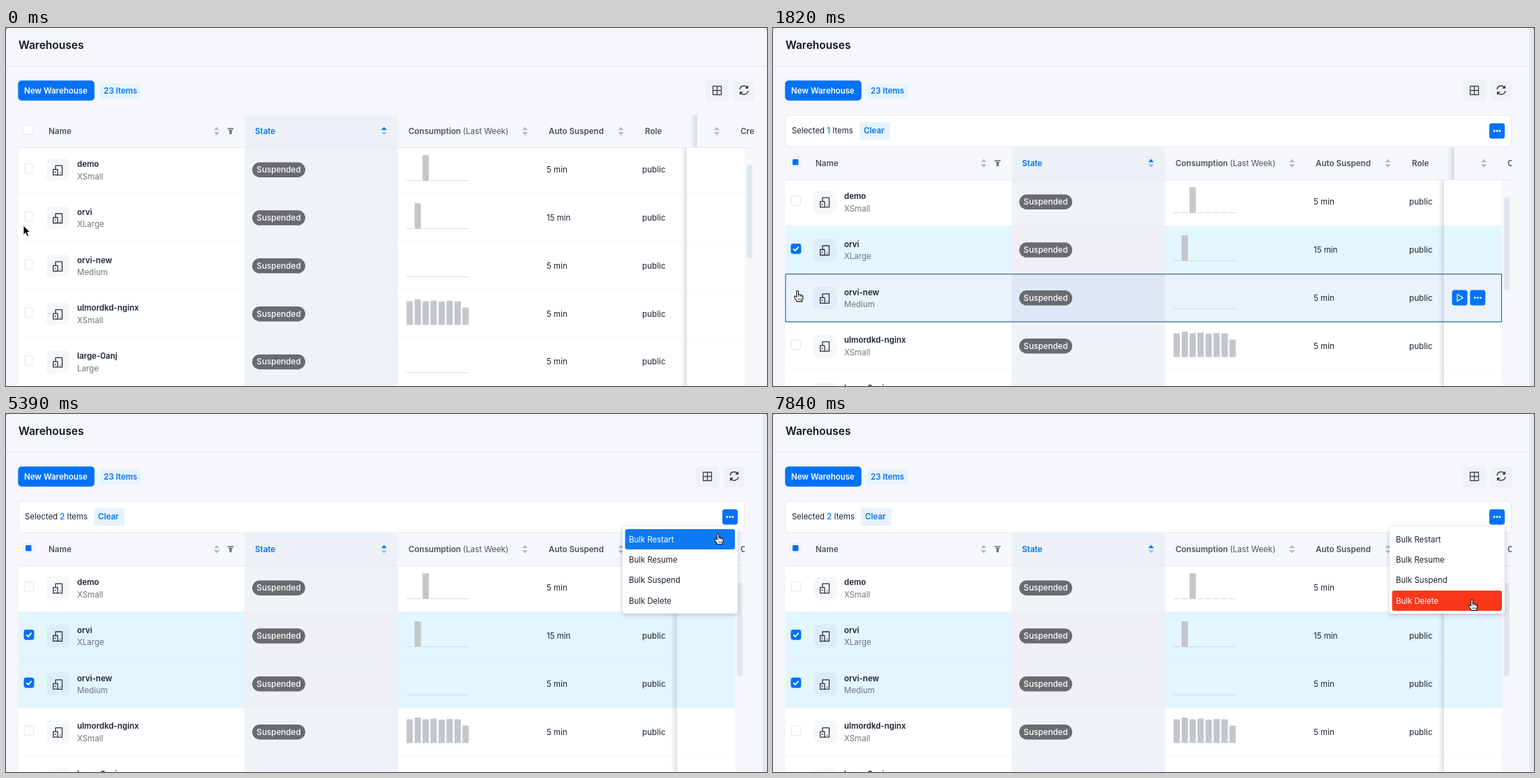
An HTML page that plays this animation: 1091 px wide and 513 px high, repeating every 7.91 s.

```html
<!DOCTYPE html>
<html lang="en">
<head>
<meta charset="utf-8">
<title>Warehouses</title>
<style>
  html, body { margin: 0; width: 100%; height: 100%; overflow: hidden; }
  svg { display: block; width: 1091px; height: 513px; background: #8a8d92; }
  text { font-family: Inter, "Open Sans", sans-serif; font-size: 11.5px; fill: #1b2430; white-space: pre; }
</style>
</head>
<body>
<svg id="stage" viewBox="0 0 1091 513"></svg>
<script>
const LOOP = 7910, STEP = 70, PITCH = 68.8, FADE = 200;
const BLUE = '#0072f5', PAGE = '#f5f7fa', LINE = '#e6eaef', GRAY = '#6d747c';
const FIRST_CLICK = 1090, SECOND_CLICK = 2380;

const rows = [
  { name: 'demo', size: 'XSmall', suspend: 5, bars: [0, 0, 37], hover: [[1090, 1330], [2890, 3000]] },
  { name: 'orvi', size: 'XLarge', suspend: 15, bars: [0, 37], hover: [[420, 1090], [1330, 1580], [2840, 2890]], near: 420, click: FIRST_CLICK },
  { name: 'orvi-new', size: 'Medium', suspend: 5, bars: [], hover: [[1580, 2840]], near: 2100, click: SECOND_CLICK },
  { name: 'ulmordkd-nginx', size: 'XSmall', suspend: 5, bars: [34, 36.5, 34, 35, 33.5, 34.5, 34, 25], hover: [] },
  { name: 'large-0anj', size: 'Large', suspend: 5, bars: [], hover: [] }
];
const menuItems = [
  { label: 'Bulk Restart', hover: [[5200, 5870]] },
  { label: 'Bulk Resume', hover: [[5870, 6450]] },
  { label: 'Bulk Suspend', hover: [[6450, 7060]] },
  { label: 'Bulk Delete', hover: [[7060, LOOP]], color: '#fa371b' }
];
const menuOpen = [[3330, 3780], [4200, LOOP]];

// time, x, y of the pointer's hot spot
const path = [
  [0, 25, 283], [70, 25, 283], [140, 31, 278], [279, 31, 278], [280, 35, 277], [420, 35, 277],
  [700, 33, 273], [1240, 33, 273], [1500, 35, 330], [1780, 35, 376], [2030, 36, 378], [2170, 40, 385],
  [2400, 40, 385], [2600, 150, 350], [2870, 592, 250], [3150, 1020, 158], [3290, 1040, 150],
  [3500, 1054, 148], [3700, 1054, 148], [3920, 1037, 149], [5110, 1037, 149], [5400, 1020, 172],
  [5700, 1012, 182], [5880, 1007, 197], [6300, 1007, 197], [6500, 1005, 226], [6800, 1004, 240],
  [7060, 1003, 266], [7770, 1003, 266], [7840, 1002, 266], [LOOP, 1002, 266]
];

const ramp = (t, start, length) => Math.min(1, Math.max(0, (t - start) / length));
const inside = (t, spans) => spans.some(([a, b]) => t >= a && t < b);
const fade = (t, spans) =>
  Math.max(0, ...spans.map(([a, b]) => ramp(t, a, FADE) - ramp(t, b, FADE)));

const rect = (x, y, w, h, fill, r = 0, more = '') =>
  `<rect x="${x}" y="${y}" width="${w}" height="${h}" fill="${fill}" rx="${r}" ${more}/>`;
const text = (x, y, s, weight = 400, fill = '#1b2430', size = 11.5, more = '') =>
  `<text x="${x}" y="${y}" font-weight="${weight}" style="fill:${fill};font-size:${size}px" ${more}>${s}</text>`;
const shape = (d, fill = 'none', stroke = 'none', width = 1.2, more = '') =>
  `<path d="${d}" fill="${fill}" stroke="${stroke}" stroke-width="${width}" stroke-linejoin="round" ${more}/>`;
const at = (x, y, s) => `<g transform="translate(${x} ${y})">${s}</g>`;

const checkbox = (x, y, border = '#e2e6eb') =>
  rect(x + .5, y + .5, 13.5, 13.5, '#fff', 2.5, `stroke="${border}"`);
const dots = (x, y) => rect(x - 11, y - 11, 22, 22, BLUE, 3.5) +
  [-4, 0, 4].map(d => `<circle cx="${x + d}" cy="${y}" r="1.4" fill="#fff"/>`).join('');
const playButton = (x, y) => rect(x - 11, y - 11, 22, 22, BLUE, 3.5) +
  at(x, y, shape('M-3.5-5V5L4.8 0z', 'none', '#fff'));
const sorter = (x, y, up = '#b4bac1') => at(x, y,
  shape('M-4-1.5L0-6L4-1.5z', up) + shape('M-4 1.5L0 6L4 1.5z', '#b4bac1'));
const stickyEdge = (x, y, h) => rect(x - 9, y, 9, h, 'url(#shade)') + rect(x - .5, y, 1, h, '#d5d9de');

function tableRow(row, i, t, dx, dy) {
  const y = +(168.2 + dy + i * PITCH).toFixed(1), edge = y + .8;
  const right = 1059 + dx, stuck = 976 + dx;
  const selected = t >= row.click, hovered = inside(t, row.hover);
  const cell = (x, w, base, tint) =>
    rect(x, edge, w, PITCH, base) + rect(x, edge, w, PITCH, tint, 0, `opacity="${fade(t, row.hover)}"`);
  const base = selected ? '#e3f5fd' : '#fff', tint = selected ? '#dcebf6' : '#eaf2fc';

  let s = cell(18, right - 18, base, tint)
    + cell(342, 220, selected ? '#eef0f5' : '#eff3f8', selected ? '#dce8f3' : '#dee8f6')
    + stickyEdge(stuck, edge, PITCH)
    + cell(stuck, right - stuck, base, selected ? '#d6e9f9' : tint)
    + rect(18, edge + PITCH - .5, right - 18, 1, selected ? '#d9eaf3' : LINE);

  s += checkbox(25.7, y + 26, t >= row.near ? BLUE : undefined);
  if (selected) {
    s += `<g opacity="${ramp(t, row.click + 30, 150)}">` + rect(25.7, y + 26, 14.5, 14.5, BLUE, 3)
      + at(25.7, y + 26, shape('M3.6 7.4l2.6 2.7l4.8-5.4', 'none', '#fff', 1.8)) + '</g>';
  }
  s += rect(58, y + 18.5, 33, 33, 'rgba(20,50,90,.035)', 6)
    + at(67, y + 28, shape('M4 6.5V1H13.5V14.5H.7V6.5H7V14.5M10 11.5h1.2M3.5 9.5v2', 'none', '#2b333d', 1.3))
    + text(102, y + 30.8, row.name, 600)
    + text(102, y + 48.4, row.size, 400, GRAY)
    + rect(353, y + 24.3, 76, 21.5, '#6a6b6e', 10.7)
    + text(391, y + 39, 'Suspended', 500, '#fff', 11.7, 'text-anchor="middle"');

  for (let k = 0; k < 8; k++) {
    const h = row.bars[k] || 1;
    s += rect((574.3 + k * 11.45).toFixed(1), y + 51 - h, 9, h, h > 1 ? '#c3c6ca' : '#d3d6da', h > 1 ? 1 : 0);
  }
  s += text(775, y + 39, row.suspend + ' min') + text(912, y + 39, 'public', 400, '#1b2430', 11.7);

  if (hovered) {
    s += rect(18, edge, right - 18.5, PITCH - .4, 'none', 0, `stroke="${selected ? '#1b73d3' : '#3468a2'}" stroke-width="1.2"`)
      + playButton(stuck + 22.5, y + 34.8) + dots(stuck + 48.3, y + 34.8);
  }
  return s;
}

function tableHead(dx, dy, t) {
  const y = 125 + dy, base = y + 26.7, mid = y + 22.7, right = 1073 + dx, stuck = 990 + dx;
  const title = (x, s, fill = '#4a545f') => text(x, base, s, 600, fill, 11.6);
  return rect(0, y, 1091, 46, PAGE) + rect(342, y, 220, 46, '#ecf1f8')
    + checkbox(24.7, y + 13.7)
    + rect(28, y + 17, 8.5, 8.5, BLUE, 1, `opacity="${ramp(t, FIRST_CLICK + 50, 150)}"`)
    + title(61, 'Name') + sorter(302, mid)
    + at(322, mid, shape('M-5-4.5H5L1.6.5V4.5H-1.6V.5z', '#6d7580') + rect(-4, -2.8, 8, .9, PAGE))
    + title(357, 'State', BLUE) + sorter(542, mid, BLUE)
    + title(577, 'Consumption <tspan font-weight="400">(Last Week)</tspan>') + sorter(744, mid)
    + title(778, 'Auto Suspend') + sorter(881.5, mid)
    + title(916, 'Role')
    + stickyEdge(stuck, y, 46) + sorter(1019, mid)
    + title(1053, 'Created')
    + rect(right, y, 1091 - right, 46, PAGE)
    + rect(18, y + 46, right - 18, 1, LINE);
}

function toolbar(dx) {
  const arc = 'M-6-1A6 6 0 0 1 5-3.3M6 1A6 6 0 0 1-5 3.3M5.4-6.5V-3H2M-5.4 6.5V3H-2';
  return text(18, 30, 'Warehouses', 600, '#10161d', 15.5)
    + rect(17.3, 75.2, 109.5, 28.8, BLUE, 5) + text(26, 93.6, 'New Warehouse', 600, '#fff', 11.5)
    + rect(134, 79, 60, 22, '#e5f3fd', 3) + text(140, 93.6, '23 Items', 600, BLUE)
    + rect(1003 + dx, 74, 33, 31, '#eff1f5', 4)
    + at(1019.5 + dx, 89.5, shape('M-6-6H6V6H-6zM0-6V6M-6 0H6', 'none', '#3d4651', 1.3))
    + rect(1043 + dx, 75, 30, 30, '#eff1f5', 4)
    + at(1058 + dx, 89, shape(arc, 'none', '#2b333d', 1.4));
}

function selectionBar(count) {
  const shift = count * 2 - 2;
  return rect(18, 125, 1040.5, 45, '#fff', 4, 'stroke="#e4e9ef"')
    + text(27, 151.3, `Selected <tspan style="fill:${BLUE}" font-weight="500">${count}</tspan> Items`, 400, '#1b2430', 11.4)
    + rect(124 + shift, 135, 44, 25, '#e6f2fd', 3)
    + text(130 + shift, 151.3, 'Clear', 600, BLUE)
    + dots(1038, 147.5);
}

function menu(t) {
  const open = fade(t, menuOpen);
  if (!open) return '';
  let s = rect(884, 161, 165, 125, '#fff', 4, 'filter="url(#shadow)"');
  menuItems.forEach((item, i) => {
    const y = 165 + i * 29.3;
    s += rect(887.5, y, 157.5, 29, item.color || BLUE, 3, `opacity="${fade(t, item.hover)}"`)
      + text(893, y + 18.6, item.label, 400, inside(t, item.hover) ? '#fff' : '#1b2430', 11.4);
  });
  return `<g opacity="${open}" transform="translate(0 161) scale(1 ${.8 + .2 * open}) translate(0 -161)">${s}</g>`;
}

function pointer(t) {
  const i = path.findIndex(p => p[0] > t), [a, b] = [path[i - 1], path[i]];
  const k = (t - a[0]) / (b[0] - a[0]);
  const glyph = t < 280
    ? shape('M0 0V13.4L3.1 10.6L5.2 15.6L7.6 14.6L5.5 9.7H9.6z', '#000', '#fff', .9)
    : shape('M-1.3 9V1.3A1.3 1.3 0 0 1 1.3 1.3V5.8Q2.6 4.8 3.8 6.2Q5 5.5 6 6.9Q7.7 6.6 7.7 8.4V11Q7.7 12.7 6.6 13.8V15.6H-.8Q-1.4 13.6-4.4 10Q-5.3 8-3.7 7.7Q-2.6 7.8-1.3 9z', '#fff', '#111', 1.1)
      + shape('M1.3 6V9M3.8 6.4V9M6 7V9.2M1.5 11V13.6M3.5 11V13.6M5.4 11V13.6', 'none', '#111', .8);
  return at(a[1] + (b[1] - a[1]) * k, a[2] + (b[2] - a[2]) * k, glyph);
}

const defs = `<defs>
  <linearGradient id="shade"><stop stop-color="#14233c" stop-opacity="0"/><stop offset="1" stop-color="#14233c" stop-opacity=".13"/></linearGradient>
  <filter id="shadow" x="-10%" y="-10%" width="120%" height="125%"><feDropShadow dx="0" dy="2" stdDeviation="3" flood-color="#1b2a40" flood-opacity=".25"/></filter>
</defs>`;

function scene(t) {
  const count = (t >= FIRST_CLICK) + (t >= SECOND_CLICK);
  const dx = count ? -14 : 0, dy = count ? 46 : 0;
  // hovered rows go last so that their outline stays on top
  const body = rows.map((row, i) => [inside(t, row.hover), tableRow(row, i, t, dx, dy)])
    .sort((a, b) => a[0] - b[0]).map(r => r[1]).join('');
  return defs + rect(0, 0, 1091, 520, PAGE, 3)
    + rect(0, 54, count ? 1081 : 1091, 1, '#e2e6ea')
    + body + tableHead(dx, dy, t)
    + (count ? rect(1084.5, 1, 6.5, 512, '#e4e9f1') : '')
    + rect(1062 + dx, 196 + dy, 8, 134, '#e1e7f1', 4)
    + toolbar(dx) + (count ? selectionBar(count) : '')
    + menu(t) + pointer(t);
}

const stage = document.getElementById('stage');
let shown = -1;
function tick() {
  const t = Math.floor(performance.now() % LOOP / STEP) * STEP;
  if (t !== shown) stage.innerHTML = scene(shown = t);
  requestAnimationFrame(tick);
}
tick();
</script>
</body>
</html>
```
